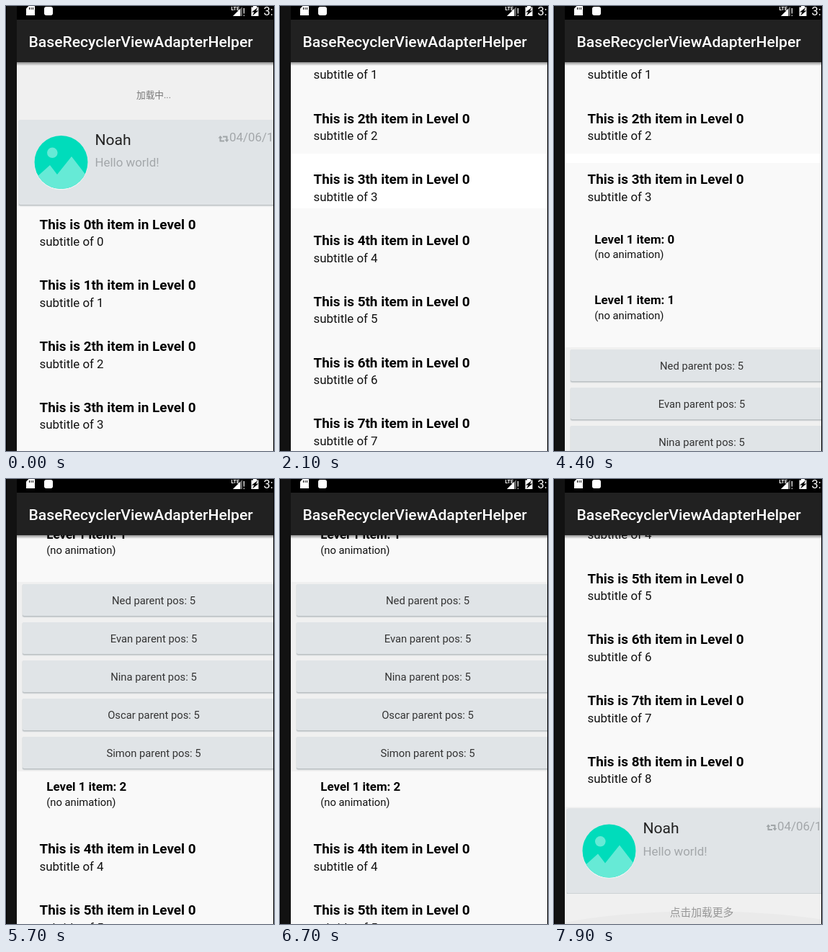
An HTML page for the animation above (9800 ms loop, 372 by 618 pixels).

```html
<!DOCTYPE html>
<html lang="zh">
<head>
<meta charset="utf-8">
<title>Expandable list</title>
<style>
html, body { margin: 0; width: 100%; height: 100%; overflow: hidden; background: #000; }
svg { display: block; font-family: Roboto, "Noto Sans CJK SC", "Noto Sans CJK", sans-serif; }
</style>
</head>
<body>
<svg id="stage" width="372" height="618" viewBox="0 0 372 618"></svg>
<script>
const LOOP = 9800, STEP = 100;
const ROW = 84.75, FIRST = 282, BLOCK = 265;
const CHILDREN = FIRST + 4 * ROW;
const $ = id => document.getElementById(id);

const text = (x, y, size, str, color = '#000', extra = '') =>
  `<text x="${x}" y="${y}" font-size="${size}" fill="${color}" ${extra}>${str}</text>`;
const rect = (x, y, w, h, color, extra = '') =>
  `<rect x="${x}" y="${y}" width="${w}" height="${h}" fill="${color}" ${extra}/>`;
const group = (id, body) => `<g id="${id}">${body}</g>`;
const range = (n, f) => Array.from({ length: n }, (_, i) => f(i)).join('');
const bold = 'font-weight="700"', middle = 'text-anchor="middle"';

// Raised panel with a thin shadow below it
const panel = (x, y, w, h) =>
  rect(x - 1, y, w + 2, h + 2.5, '#e2e4e5', 'rx="3"') +
  rect(x, y + 1, w, h + .3, '#bcc1c4', 'rx="2"') +
  rect(x, y, w, h, '#e0e4e7', 'rx="2"');

const item = n => {
  const y = FIRST + n * ROW;
  return text(46.5, y + 27.5, 18.9, `This is ${n}th item in Level 0`, '#000', bold) +
    text(46.5, y + 51, 16.9, `subtitle of ${n}`, '#111');
};

const subItem = n => {
  const y = CHILDREN + n * ROW;
  return text(56.3, y + 25, 16.9, `Level 1 item: ${n}`, '#000', bold) +
    text(56.3, y + 45.5, 14.78, '(no animation)', '#111');
};

const card = y => `<g transform="translate(0 ${y})">` +
  rect(15, -1, 356, 122, '#f0f0f0') + panel(18, 1, 374, 118) +
  `<circle cx="76.5" cy="61" r="37.3" fill="#f2f5f5"/>
   <circle cx="76.5" cy="60" r="37" fill="#00dcbb"/>
   <circle cx="64.3" cy="46.8" r="7.3" fill="#66ead6"/>
   <path d="M30 92L61 64L71 77L91 52L122 92V100H30Z" fill="#66ead6" clip-path="url(#disc)"/>
   <path d="M297.5 25V30.5H303M306.5 30V24.5H301" fill="none" stroke="#a0a5a8" stroke-width="2"/>
   <path d="M294.5 26.5L297.5 23L300.5 26.5ZM303.5 28.5L306.5 32L309.5 28.5Z" fill="#a0a5a8"/>` +
  text(123.5, 35.5, 21.1, 'Noah', '#212121') +
  text(123.5, 66, 16.9, 'Hello world!', '#a3a7aa') +
  text(310, 31, 16.9, '04/06/16', '#a3a7aa') + '</g>';

const names = ['Ned', 'Evan', 'Nina', 'Oscar', 'Simon'];
const blockTop = CHILDREN + 2 * ROW;
const buttons = rect(15, blockTop, 356, BLOCK - 2, '#f0f0f0') +
  names.map((name, i) => {
    const y = blockTop + 3 + i * 53;
    return panel(23, y, 364, 44) +
      text(205, y + 27.5, 14.78, `${name} parent pos: 5`, '#333', middle);
  }).join('');

const loader = rect(15, 78, 356, 79, '#f0f0f0') +
  text(205, 128, 12.67, '加载中...', '#777', middle) +
  '<circle id="spin" cx="104.5" cy="123" r="6.5" fill="none" stroke="#9a9a9a" stroke-width="2" pathLength="100"/>';

const end = FIRST + 9 * ROW;
const footer = rect(15, end + 120, 356, 80, '#f0f0f0') +
  text(205, end + 150.5, 14.78, '点击加载更多', '#999', middle);

const statusBar = rect(15, 0, 356, 19, '#000') +
  `<path d="M31.5 0H40V13H28V3.5Z" fill="#fff"/>
   <path d="M32.5 2V5M35 2V5M37.5 2V5" stroke="#000"/>` +
  rect(53, 1, 12, 12, '#fff', 'rx="3"') +
  text(312.5, 6, 7, 'LTE', '#fff', bold) +
  `<path d="M328 1V14H315Z" fill="#666"/><path d="M325 4V14H315Z" fill="#fff"/>` +
  text(328.5, 14, 14, '!', '#fff') +
  `<path d="M343 0H348V1.5H350.5V14H340.5V1.5H343Z" fill="#fff"/>
   <path d="M349.5 2L341 8.5H344.5L342 13.5L350.5 6.5H347Z" fill="#000"/>` +
  text(357.5, 13, 16.5, '3:', '#fff');

$('stage').innerHTML = `<defs>
  <clipPath id="disc"><circle cx="76.5" cy="60" r="37"/></clipPath>
  <clipPath id="view"><rect x="15" y="78" width="356" height="540"/></clipPath>
  <linearGradient id="shade" x2="0" y2="1">
    <stop stop-opacity=".42"/><stop offset="1" stop-opacity="0"/>
  </linearGradient></defs>` +
  rect(1, 0, 14, 618, '#121212') + rect(15, 78, 356, 540, '#f9f9f9') +
  '<g clip-path="url(#view)">' + rect(15, 205, 356, 76, '#fff', 'id="flash"') +
  group('list',
    loader + card(157) + range(4, item) +
    group('level1', subItem(0) + subItem(1) + group('last', subItem(2))) +
    group('buttons', buttons) +
    group('tail', range(5, i => item(i + 4)) + card(end + .5) + footer)) +
  '<ellipse id="glow" cx="205" cy="660" rx="280" ry="60" fill="#000" opacity=".025"/></g>' +
  rect(15, 78, 356, 5, 'url(#shade)') + rect(15, 19, 356, 59, '#212121') +
  text(31.5, 57, 21.1, 'BaseRecyclerViewAdapterHelper', '#fff', 'font-weight="500"') +
  statusBar + rect(371, 0, 1, 618, '#000');

// [time, scroll offset]
const scrollKeys = [[0, 0], [900, 0], [1400, 79], [1900, 79], [2100, 316.4], [4900, 316.4],
  [5200, 613.4], [5600, 613.4], [5700, 647.4], [6000, 613.4], [6200, 602], [6400, 615],
  [6700, 647.4], [6900, 647.4], [7300, 900], [7500, 900], [7900, 1108], [LOOP, 1108]];

const clamp = u => Math.max(0, Math.min(1, u));
const easeOut = u => u * (2 - u);
const scrollAt = t => {
  const i = scrollKeys.findIndex(k => k[0] > t);
  const [t0, a] = scrollKeys[i - 1], [t1, b] = scrollKeys[i];
  return a + (b - a) * easeOut((t - t0) / (t1 - t0));
};
const moveY = (id, y) => $(id).setAttribute('transform', `translate(0 ${y})`);
const show = (id, on) => $(id).setAttribute('visibility', on ? 'visible' : 'hidden');

function draw(t) {
  const open = t >= 4400;
  const shift = 3 * ROW * easeOut(clamp((t - 3100) / 300));
  moveY('list', -scrollAt(t));
  moveY('tail', shift + (open ? BLOCK : 0));
  moveY('last', open ? BLOCK : 0);
  show('level1', t >= 3600);
  show('buttons', open);
  show('glow', t >= 7900);
  show('flash', t >= 2100 && t < 5000);
  $('flash').setAttribute('height', t < 3200 ? 76 : 13);

  const arc = 75 * Math.sin(Math.PI * clamp(t / 800));
  show('spin', t > 0 && t < 800);
  $('spin').setAttribute('stroke-dasharray', `${arc} 100`);
  $('spin').setAttribute('transform', `rotate(${t * .45 - 90} 104.5 123)`);
}

const start = performance.now();
function tick() {
  const t = (performance.now() - start) % LOOP;
  draw(Math.floor(t / STEP) * STEP);
  requestAnimationFrame(tick);
}
tick();
</script>
</body>
</html>
```
